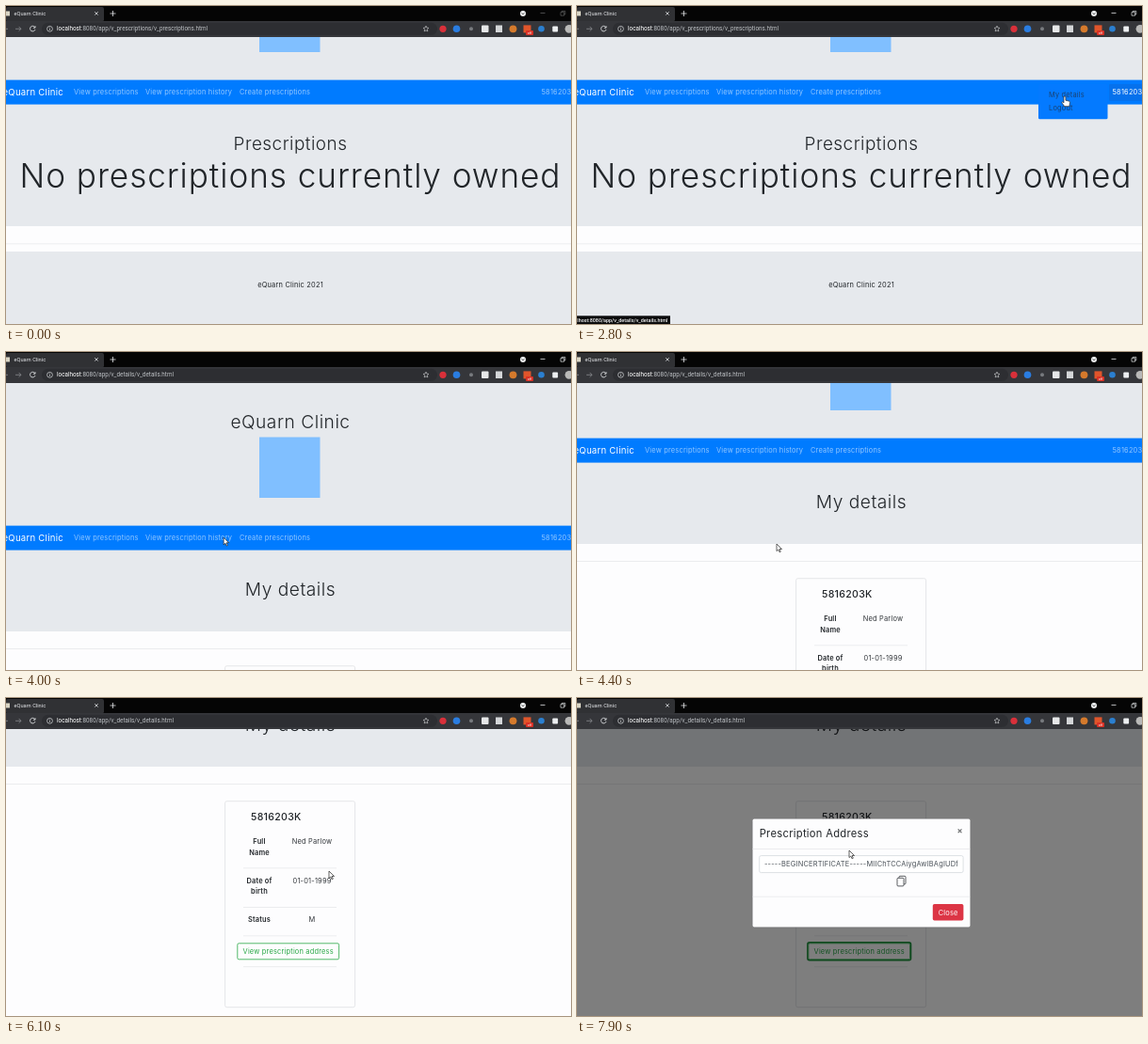
These frames come from a looping animation (600 by 338 pixels, 8 s). An HTML page:

```html
<!DOCTYPE html>
<html lang="en">
<head>
<meta charset="utf-8">
<title>eQuarn Clinic</title>
<style>
  html, body { margin: 0; width: 100%; height: 100%; overflow: hidden; background: #fdfdfe; }
  svg { display: block; width: 100vw; height: 100vh; }
  text { font-family: Inter, "Open Sans", sans-serif; letter-spacing: .026em; white-space: pre; }
  .ui { font-family: Roboto, Arial, sans-serif; letter-spacing: 0; }
</style>
</head>
<body>
<svg id="stage" viewBox="0 0 600 338"></svg>
<script>
const LOOP = 8000;
const BRAND = 'eQuarn Clinic', USER = '5816203K';
const INK = '#212529', GREY = '#e6e9ed', BLUE = '#007bff', GREEN = '#28a745';
const HOST = 'localhost:8080';
const BODY = 7.43;
const LIGHT = 'font-weight="300"';

const rect = (x, y, w, h, fill, more = '') =>
  `<rect x="${x}" y="${y}" width="${w}" height="${h}" fill="${fill}" ${more}/>`;
const text = (x, y, str, size, fill, more = '') =>
  `<text x="${x}" y="${y}" font-size="${size}" fill="${fill}" ${more}>${str}</text>`;
const mid = (x, y, str, size, fill = INK, more = '') =>
  text(x, y, str, size, fill, 'text-anchor="middle" ' + more);
const path = (d, stroke, width = 0.8, fill = 'none', more = '') =>
  `<path d="${d}" stroke="${stroke}" stroke-width="${width}" fill="${fill}" ${more}/>`;
const dot = (x, y, r, fill, more = '') => `<circle cx="${x}" cy="${y}" r="${r}" fill="${fill}" ${more}/>`;
const group = (id, body, more = '') => `<g id="${id}" ${more}>${body}</g>`;
const rule = (x, y, w) => rect(x, y, w, 0.6, '#dfe1e4');

// Banner and navigation, shared by both pages
function banner(userId) {
  const link = 'fill-opacity=".58"';
  return rect(0, 33, 600, 152, GREY) +
    mid(302, 80.5, BRAND, 19.2, INK, LIGHT) +
    rect(269, 90.5, 64.5, 64.5, '#80bfff') +
    rect(0, 184.6, 600, 26, BLUE) +
    text(61, 201.3, BRAND, 9.6, '#fff', 'text-anchor="end"') +
    text(72, 200.3, 'View prescriptions', BODY, '#fff', link) +
    text(148, 200.3, 'View prescription history', BODY, '#fff', link) +
    text(248, 200.3, 'Create prescriptions', BODY, '#fff', link) +
    text(568.5, 200.3, USER, BODY, '#fff', `id="${userId}" ${link}`);
}

function listPage() {
  const menu =
    rect(490, 189, 73.5, 37.2, '#047aff', 'rx="1.5"') +
    text(501, 202.7, 'My details', BODY, '#1a4373') +
    text(501, 217.4, 'Logout', BODY, '#1a4373');
  return rect(0, 210, 600, 130, GREY) +
    banner('listUser') +
    mid(302, 258.5, 'Prescriptions', 18.9, INK, LIGHT) +
    mid(302, 299, 'No prescriptions currently owned', 35.2, INK, LIGHT) +
    rule(0, 358.6, 600) +
    rect(0, 367, 600, 90, GREY) +
    mid(302, 404.8, BRAND + ' 2021', BODY) +
    group('menu', rect(565, 189, 40, 18, '#0a6be0', 'rx="1" fill-opacity=".6"') +
      text(568.5, 200.3, USER, BODY, '#fff') + menu);
}

function detailsPage() {
  const label = (y, str) => mid(269, y, str, BODY, INK, 'font-weight="600"');
  const value = (y, str) => mid(325, y, str, BODY, '#33373b');
  const caption = (fill, more) => mid(299.7, 271.6, 'View prescription address', BODY, fill, more);
  const card =
    rect(232.6, 109.7, 138, 219, '#fdfdfe', 'rx="2" stroke="#dcdde0" stroke-width=".7"') +
    text(260, 129.9, USER, 10.6, INK, 'font-weight="500"') +
    label(155.4, 'Full') + label(166.5, 'Name') + value(155.4, 'Ned Parlow') +
    rule(252, 180.6, 99) +
    label(196.8, 'Date of') + label(207.9, 'birth') + value(196.8, '01-01-1999') +
    rule(252, 222, 99) +
    label(238.4, 'Status') + value(238.4, 'M') +
    rule(252, 252.6, 99) +
    rect(244.9, 259.9, 109.6, 18.8, 'none', `id="ring" rx="2" stroke="#1d8f3b" stroke-width="1.6"`) +
    rect(245.8, 260.8, 107.8, 17, '#fdfdfe', `rx="1.5" stroke="${GREEN}" stroke-width=".8"`) +
    caption(GREEN) +
    group('hover', rect(245.8, 260.8, 107.8, 17, GREEN, 'rx="1.5"') + caption('#fff')) +
    rule(252, 285.5, 99);
  return rect(0, 210, 600, 87, GREY) +
    banner('detailsUser') +
    mid(302, 259, 'My details', 19.2, INK, LIGHT) +
    rule(0, 315.4, 600) +
    `<g transform="translate(0 224)">${card}</g>`;
}

function modalBox() {
  return rect(186.2, 128.2, 231.6, 115.6, '#fdfdfe', 'rx="2" stroke="#6b6b6c" stroke-width=".5"') +
    text(193.7, 147.6, 'Prescription Address', 11.2, INK) +
    mid(406.7, 144.2, '×', 9, '#6d6f71', 'font-weight="700"') +
    rule(186.4, 160, 231) +
    rect(193.7, 167.6, 216.4, 18, '#fff', 'rx="1.8" stroke="#ced4da" stroke-width=".7"') +
    `<g clip-path="url(#field)">` +
    text(199, 179.3, '-----BEGINCERTIFICATE-----MIIChTCCAiygAwIBAgIUDfUkQ', BODY, '#495057') + '</g>' +
    rect(342, 189.3, 7, 8.6, '#fdfdfe', 'rx="1" stroke="#33373b" stroke-width=".8"') +
    rect(340, 191.3, 7, 8.6, '#fdfdfe', 'rx="1" stroke="#33373b" stroke-width=".8"') +
    rule(186.4, 210.8, 231) +
    rect(377.8, 219, 32.6, 17.6, '#dc3545', 'rx="1.8"') +
    mid(394.1, 230.6, 'Close', BODY, '#fff');
}

function chrome() {
  const star = 'M446 21.2l.9 1.9 2 .3-1.5 1.4.4 2.1-1.8-1-1.8 1 .4-2.1-1.5-1.4 2-.3z';
  const icon = '#dcdee0';
  return rect(0, 0, 600, 16, '#050505') +
    rect(0, 1, 104, 15.5, '#303134', 'rx="2"') +
    rect(0, 16, 600, 17, '#35363a') +
    rect(38, 17.8, 420, 13, '#2d2e32', 'rx="6.5"') +
    rect(0, 5.5, 4, 5, '#d9d5c4') +
    text(8.5, 10, BRAND, 5.7, '#e8eaed', 'class="ui"') +
    path('M94.3 6.2l3.4 3.4m0-3.4l-3.4 3.4M113.5 5v6m-3-3h6', '#e8eaed') +
    dot(549, 8, 3, '#f1f3f4') + path('M547.7 7.4l1.3 1.4 1.3-1.4', '#111', 0.8) +
    group('windowButtons', path('M567.5 7.5h5', icon) +
      path('M589 6.6h3.6v3.6h-3.6zM590.2 6.6v-1.2h3.6v3.6h-1.2', icon, 0.7)) +
    path('M0 24.3h2M10 24.3h6m-2.4-2.4l2.4 2.4-2.4 2.4', '#8a8c90') +
    path('M30.7 22.6a2.8 2.8 0 1 0 .3 2.4M31 21.2v2h-2', icon, 0.9) +
    dot(46.5, 24.3, 2.9, 'none', `stroke="${icon}" stroke-width=".7"`) + path('M46.5 23.8v2m0-3.3v.7', icon, 0.7) +
    `<text id="url" class="ui" x="54" y="26.3" font-size="6.35" fill="#bcbfc3"><tspan fill="#fff">${HOST.slice(0, 9)}</tspan><tspan id="urlPath"></tspan></text>` +
    path(star, icon, 0.6) +
    dot(464, 24.3, 3.6, '#d9303a') + dot(478.5, 24.3, 3.8, '#2a7de1') + dot(494, 24.3, 2, '#777a7e') +
    rect(505, 20.5, 7.5, 7.5, '#e6e7e8', 'rx="1"') + rect(520, 20.5, 7, 7.5, '#d4d6d8') +
    dot(538.5, 24.3, 3.9, '#d57a2c') + rect(549.5, 20.4, 8, 8, '#e0552b') +
    rect(552, 26, 8, 5, '#d93025', 'rx="1"') + mid(556, 29.8, 'off', 3.6, '#fff', 'class="ui"') +
    dot(568.5, 24.3, 3.3, '#2b7fd0') +
    rect(580.3, 21.6, 5.8, 5.8, '#eceef0', 'rx="1"') +
    dot(598, 24.3, 4.4, '#b9b9b8');
}

const arrow = path('M0 0v7.6l1.8-1.6 1.3 2.8 1.2-.6-1.3-2.7h2.5z', '#222', 0.7, '#fff', 'id="arrow"');
const hand = path('M-.9 .7c0-1 1.7-1 1.7 0v3l3 .7c.8.2 1 .7.9 1.5l-.5 3.4h-4.4l-2.3-3c-.7-1 .3-1.6 1-.9l.6.6z',
  '#222', 0.6, '#fff', 'id="hand" transform="scale(1.15)"');

document.getElementById('stage').innerHTML =
  `<defs><clipPath id="field">${rect(198, 168, 206.3, 17, '#000')}</clipPath></defs>` +
  rect(0, 0, 600, 338, '#fdfdfe') +
  group('list', listPage(), 'transform="translate(0 -106)"') +
  group('details', detailsPage()) +
  rect(0, 33, 600, 305, '#000', 'id="shade"') +
  group('modal', modalBox()) +
  group('status', rect(-2, 329.3, 101, 10, '#0b0b0c', 'id="statusBox"') +
    text(96.3, 336, '', 5.4, '#f4f5f6', 'id="statusText" class="ui" font-weight="500" text-anchor="end"')) +
  chrome() +
  group('cursor', arrow + hand);

const ui = {};
document.querySelectorAll('#stage [id]').forEach(el => ui[el.id] = el);
const set = (id, name, value) => ui[id].setAttribute(name, value);
const show = (id, on) => set(id, 'visibility', on ? 'visible' : 'hidden');
const write = (id, str) => { if (ui[id].textContent !== str) ui[id].textContent = str; };

const ramp = (t, from, to) => Math.min(1, Math.max(0, (t - from) / (to - from)));
const smooth = p => p * p * (3 - 2 * p);
const easeOut = p => 1 - (1 - p) ** 2;

// Pointer stops: time, x, y
const STOPS = [
  [500, 277, 265], [1150, 577, 93], [1900, 577, 93], [2250, 562, 97], [2800, 518, 96],
  [3450, 518, 96], [4100, 212, 204], [4800, 212, 204], [5600, 305, 150], [6100, 343, 184],
  [6550, 304, 267], [7060, 304, 267], [7400, 372, 214], [7700, 262, 178], [7900, 289, 162]
];

function pointer(t) {
  const i = STOPS.findIndex(s => s[0] > t);
  if (i === 0) return STOPS[0].slice(1);
  if (i < 0) return STOPS[STOPS.length - 1].slice(1);
  const [t0, x0, y0] = STOPS[i - 1], [t1, x1, y1] = STOPS[i];
  const p = smooth(ramp(t, t0, t1));
  return [x0 + (x1 - x0) * p, y0 + (y1 - y0) * p];
}

function draw(t) {
  const onDetails = t >= 3000;
  show('list', !onDetails);
  show('details', onDetails);
  write('urlPath', ':8080/app/' + (onDetails ? 'v_details/v_details' : 'v_prescriptions/v_prescriptions') + '.html');
  set('windowButtons', 'opacity', t < 1500 ? 0.4 : 1);

  set('menu', 'display', t >= 1250 && !onDetails ? 'inline' : 'none');
  set('listUser', 'fill-opacity', t >= 1100 ? 0 : 0.58);

  const scroll = 93 * smooth(ramp(t, 4050, 4380)) + 131 * smooth(ramp(t, 4650, 5100));
  set('details', 'transform', `translate(0 ${-scroll})`);

  show('status', t >= 1700 && t < 3900);
  write('statusText', onDetails ? 'Waiting for localhost...' : HOST + '/app/v_details/v_details.html');
  set('statusText', 'x', onDetails ? 45.5 : 96.3);
  set('statusBox', 'width', onDetails ? 200.5 : 101);

  set('hover', 'opacity', ramp(t, 6450, 6600) - ramp(t, 6850, 7000));
  set('ring', 'opacity', ramp(t, 6700, 6800));
  set('shade', 'opacity', 0.5 * ramp(t, 6890, 7040));
  set('modal', 'opacity', ramp(t, 7050, 7200));
  set('modal', 'transform', `translate(0 ${-23 * (1 - easeOut(ramp(t, 7050, 7350)))})`);

  const [x, y] = pointer(t);
  const overLink = (t >= 1080 && t < 3000) || (t >= 6500 && t < 7060);
  set('cursor', 'transform', `translate(${x} ${y})`);
  set('cursor', 'display', t >= 500 ? 'inline' : 'none');
  set('hand', 'display', overLink ? 'inline' : 'none');
  set('arrow', 'display', overLink ? 'none' : 'inline');
}

const start = performance.now();
function tick() {
  draw((performance.now() - start) % LOOP);
  requestAnimationFrame(tick);
}
tick();
</script>
</body>
</html>
```
